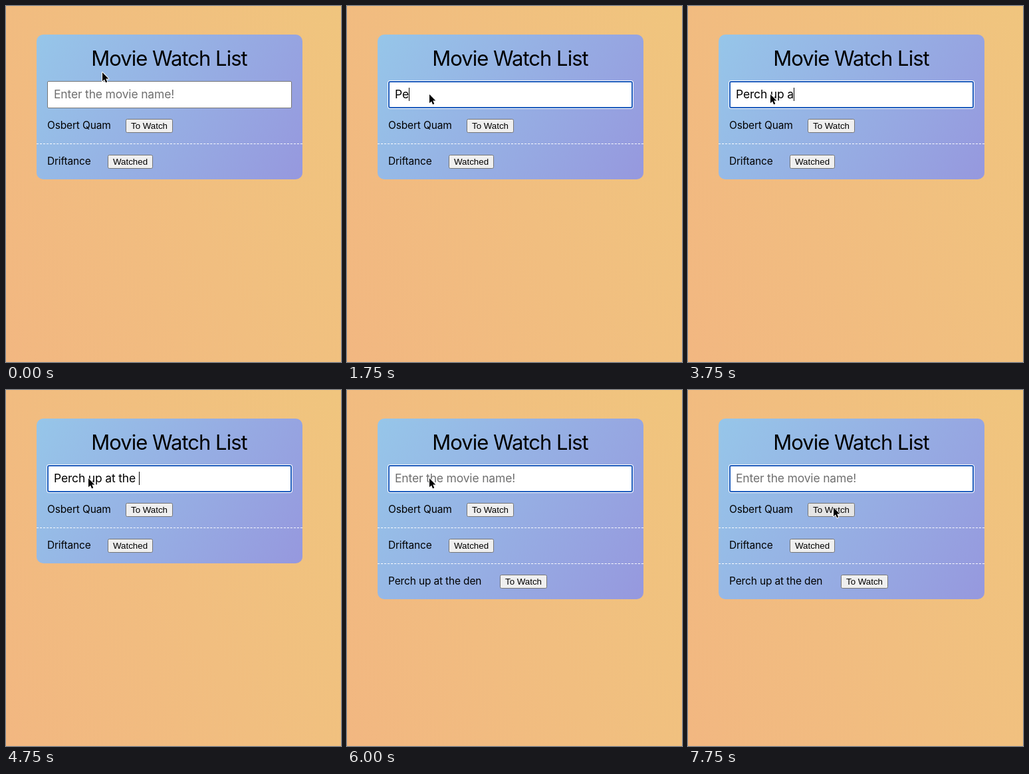
An HTML page for the animation above (8000 ms loop, 504 by 536 pixels).

```html
<!DOCTYPE html>
<html lang="en">
<head>
<meta charset="utf-8">
<title>Movie Watch List</title>
<style>
  html, body { margin: 0; width: 504px; height: 536px; overflow: hidden; }
  body { position: relative; background: linear-gradient(65deg, #f2b781, #f0c57e); }
  #card {
    position: absolute; left: 46px; top: 43px; width: 400px; height: 218px;
    border-radius: 10px; background: linear-gradient(122deg, #96c6e9, #9698de);
  }
  svg { position: absolute; left: 0; top: 0; }
  text { font: 15.5px Inter, sans-serif; font-optical-sizing: none; letter-spacing: -.01em; }
  #title { font-size: 31px; letter-spacing: -.032em; text-anchor: middle; }
  #entry { font-size: 17.5px; }
  .button rect { fill: #efefef; stroke: #767676; }
  .button.hover rect { fill: #e5e5e5; }
  .button text {
    font: 13.333px "Liberation Sans", Arial, sans-serif;
    letter-spacing: 0; text-anchor: middle;
  }
  .rule { stroke: #fff; stroke-dasharray: 3 2.025; }
</style>
</head>
<body>
<div id="card"></div>
<svg width="504" height="536" viewBox="0 0 504 536">
  <text id="title" x="245.5" y="90">Movie Watch List</text>
  <rect id="idle" x="62.5" y="113.5" width="367" height="40" rx="1.5" fill="#fff" stroke="#767676"/>
  <g id="focus">
    <rect x="61" y="112" width="370" height="43" rx="4" fill="#fff"/>
    <rect x="63" y="114" width="366" height="39" rx="2" fill="#fff" stroke="#1f5dbd" stroke-width="2"/>
  </g>
  <text id="entry" x="72" y="139"></text>
  <rect id="caret" y="123" width="1" height="20"/>
  <g id="rows"></g>
  <path id="mouse" d="M0 0V13.2L3 10.4L5.1 15.2L7.3 14.3L5.2 9.6H9.3Z"
        stroke="#fff" stroke-width="2" stroke-linejoin="round" paint-order="stroke"/>
</svg>
<script>
  const LOOP = 8000, TICK = 250, BLINK = 500;
  const FOCUS = 750, TYPE = 1500, RESUME = 3250, TYPED = 5250, SUBMIT = 6000;
  const LEAVE = 6500, ARRIVE = 7250, HOVER = 7750;
  const MOVIE = 'Perch up at the den';
  const FIRST_WORD = 'Perch '.length;
  const HINT = 'Enter the movie name!';

  const start = { x: 145, y: 100 };
  const field = { x: 124, y: 133 };
  const newButton = { x: 254, y: 303 };
  const firstButton = { x: 219, y: 177 };

  const $ = id => document.getElementById(id);
  const clamp = (v, lo, hi) => Math.min(hi, Math.max(lo, v));
  const show = (el, on) => el.setAttribute('visibility', on ? 'visible' : 'hidden');

  function addRow(index, name, label, x, width) {
    const y = 170 + index * 54;
    const row = document.createElementNS('http://www.w3.org/2000/svg', 'g');
    const rule = index ? `<path class="rule" d="M46 ${y - 16.5}H446"/>` : '';
    row.innerHTML = `${rule}<text x="62" y="${y + 15}">${name}</text>
      <g class="button">
        <rect x="${x + .5}" y="${y + .5}" width="${width - 1}" height="20" rx="2"/>
        <text x="${x + width / 2}" y="${y + 15}">${label}</text>
      </g>`;
    $('rows').append(row);
    return row;
  }

  const firstRow = addRow(0, 'Osbert Quam', 'To Watch', 180, 71);
  addRow(1, 'Driftance', 'Watched', 153, 68);
  const newRow = addRow(2, MOVIE, 'To Watch', 230, 71);

  // One key per tick for the first word, then a pause, then a faster rate.
  function keysTyped(t) {
    if (t >= SUBMIT) return 0;
    if (t < RESUME) return clamp((t - TYPE) / TICK + 1, 0, FIRST_WORD);
    return Math.min(MOVIE.length, Math.round(FIRST_WORD + 1 + 1.5 * (t - RESUME) / TICK));
  }

  // The caret stays lit while typing and blinks after focus and after the last key.
  function caretLit(t) {
    if (t < FOCUS) return false;
    if (t >= TYPE && t < TYPED) return true;
    const since = t < TYPE ? FOCUS : TYPED;
    return Math.floor((t - since) / BLINK) % 2 === 0;
  }

  function glide(t, from, to, begin, end) {
    const p = 1 - (1 - clamp((t - begin) / (end - begin), 0, 1)) ** 2;
    return { x: from.x + (to.x - from.x) * p, y: from.y + (to.y - from.y) * p };
  }

  function pointer(t) {
    if (t < LEAVE) return glide(t, start, field, 0, FOCUS);
    if (t < ARRIVE) return glide(t, field, newButton, LEAVE, ARRIVE);
    return glide(t, newButton, firstButton, ARRIVE, HOVER);
  }

  function draw(t) {
    const count = keysTyped(t);
    const entry = $('entry');
    entry.textContent = (count ? MOVIE.slice(0, count) : HINT).replace(/ /g, '\u00a0');
    entry.setAttribute('fill', count ? '#000' : '#6f6f6f');
    const width = count ? entry.getComputedTextLength() : 0;
    $('caret').setAttribute('x', Math.round(72 + width));
    show($('caret'), caretLit(t));
    show($('focus'), t >= FOCUS);
    show($('idle'), t < FOCUS);

    const done = t >= SUBMIT;
    show(newRow, done);
    $('card').style.height = (done ? 272 : 218) + 'px';
    firstRow.querySelector('.button').classList.toggle('hover', t >= HOVER);

    const { x, y } = pointer(t);
    $('mouse').setAttribute('transform', `translate(${Math.round(x)} ${Math.round(y)})`);
  }

  function tick() {
    const t = performance.now() % LOOP;
    draw(t - t % TICK);
    requestAnimationFrame(tick);
  }
  tick();
</script>
</body>
</html>
```
